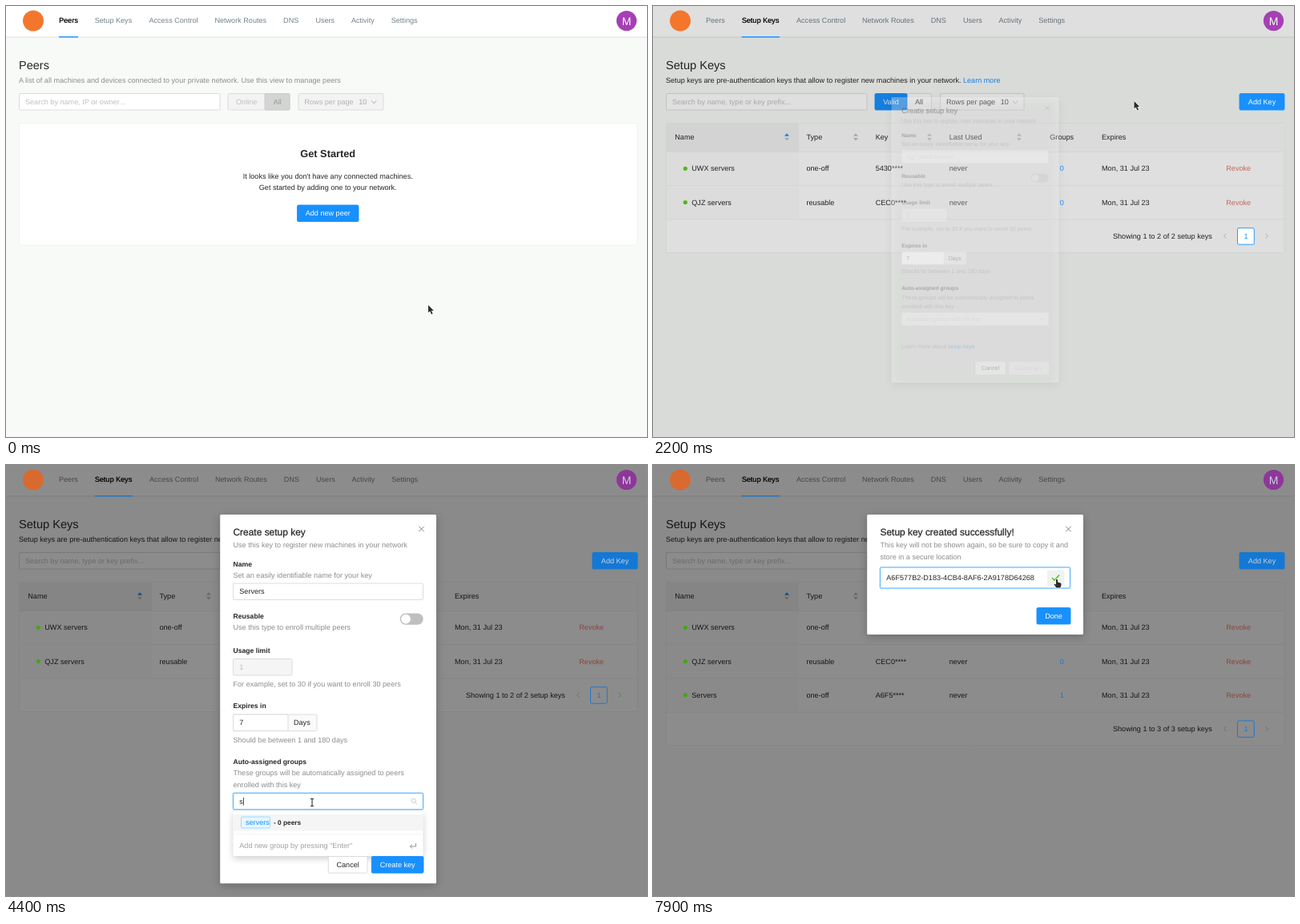
Write an HTML page with a canvas that moves like this. It is 800 by 539 pixels and loops after 8000 ms.

```html
<!DOCTYPE html>
<html lang="en">
<head>
<meta charset="utf-8">
<title>Setup keys</title>
<style>
  html, body { margin: 0; width: 100%; height: 100%; overflow: hidden; background: #f8faf8; }
  canvas { display: block; }
</style>
</head>
<body>
<canvas id="stage" width="800" height="539"></canvas>
<script>
const ctx = document.getElementById('stage').getContext('2d');
const LOOP = 8000, STEP = 100, BODY = 9.1;
const INK = '#262626', MUTED = '#8c8c8c', FAINT = '#bfbfbf', LINE = '#d9d9d9', BLUE = '#1890ff';

// Moments of the story, in ms
const AT = {
  keysPage: 1000, modal: 2150, focusName: 2700, typeName: 2950, focusGroups: 4200,
  typeGroup: 4400, addGroup: 5200, closeGroups: 5900, create: 6500, done: 6850, copied: 7600
};
const POINTER_PATH = [
  [0, 527, 374], [300, 527, 374], [900, 133, 18], [1200, 133, 18], [1900, 770, 118], [2100, 770, 118],
  [2300, 431, 120], [2600, 384, 157], [3700, 384, 157], [4100, 382, 422], [5400, 382, 422],
  [5800, 500, 350], [5900, 500, 350], [6400, 487, 498], [6900, 487, 498], [7500, 503, 143], [8000, 503, 143]
];

const clamp = v => Math.max(0, Math.min(1, v));
const smooth = v => v * v * (3 - 2 * v);

// y is the middle of the capital letters
function text(str, x, y, color = INK, { size = BODY, bold = false, align = 'left' } = {}) {
  ctx.font = `${bold ? 'bold ' : ''}${size}px "Liberation Sans", Arial, sans-serif`;
  ctx.textRendering = 'geometricPrecision';
  ctx.textAlign = align;
  ctx.fillStyle = color;
  ctx.fillText(str, x, y + size * 0.35);
  return ctx.measureText(str).width;
}
const label = (str, y) => text(str, 283.5, y, INK, { size: 8.65, bold: true });
const hint = (str, y) => text(str, 283.5, y, MUTED);

function heading(str, y) {
  text(str, 283.5, y, INK, { size: 11.95 });
  ctx.strokeStyle = INK;
  ctx.lineWidth = 0.25;
  ctx.strokeText(str, 283.5, y + 11.95 * 0.35);
}

function box(x1, y1, x2, y2, fill, stroke, radius = 1.5) {
  ctx.beginPath();
  ctx.roundRect(x1, y1, x2 - x1, y2 - y1, radius);
  if (fill) { ctx.fillStyle = fill; ctx.fill(); }
  if (stroke) { ctx.strokeStyle = stroke; ctx.lineWidth = 0.9; ctx.stroke(); }
}

function fill(x, y, w, h, color) {
  ctx.fillStyle = color;
  ctx.fillRect(x, y, w, h);
}

function disc(x, y, r, color) {
  ctx.beginPath();
  ctx.arc(x, y, r, 0, 7);
  ctx.fillStyle = color;
  ctx.fill();
}

function stroke(points, color, width = 0.9) {
  ctx.beginPath();
  points.forEach(([x, y]) => ctx.lineTo(x, y));
  ctx.strokeStyle = color;
  ctx.lineWidth = width;
  ctx.stroke();
}

function polygon(points, color) {
  ctx.beginPath();
  points.forEach(([x, y]) => ctx.lineTo(x, y));
  ctx.closePath();
  ctx.fillStyle = color;
  ctx.fill();
}

const chevron = (x, y, color = FAINT) => stroke([[x - 3, y - 1.7], [x, y + 1.9], [x + 3, y - 1.7]], color);
const check = (x, y, r, color, width) =>
  stroke([[x - r, y], [x - r * 0.3, y + r * 0.7], [x + r, y - r * 0.8]], color, width);
function cross(x, y, r, color) {
  stroke([[x - r, y - r], [x + r, y + r]], color);
  stroke([[x - r, y + r], [x + r, y - r]], color);
}

function button(str, x1, y1, x2, y2, color = BLUE, textColor = '#fff', border = color) {
  box(x1, y1, x2, y2, color, border);
  text(str, (x1 + x2) / 2, (y1 + y2) / 2, textColor, { align: 'center' });
}

function field(x1, y1, x2, y2, focused) {
  if (focused) box(x1 - 1, y1 - 1, x2 + 1, y2 + 1, '#d4ebff', null, 2.5);
  box(x1, y1, x2, y2, '#fff', focused ? '#40a9ff' : LINE);
}

function caret(x, y, t) {
  if (t % 1000 < 600) fill(x + 0.3, y - 5, 0.8, 10, INK);
}

const typed = (str, start, pace, t) => str.slice(0, Math.max(0, Math.floor((t - start) / pace) + 1));

// ---- Page ----

function navigation(onKeys) {
  fill(0, 0, 800, 38.5, '#fff');
  fill(0, 38.5, 800, 1, '#e2e4e2');
  const tabs = [['Peers', 66], ['Setup Keys', 110.7], ['Access Control', 179], ['Network Routes', 261],
    ['DNS', 346.7], ['Users', 387], ['Activity', 431.5], ['Settings', 481.3]];
  tabs.forEach(([name, x], i) => {
    const active = i === (onKeys ? 1 : 0);
    text(name, x - (onKeys || i < 2 ? 0 : 0.6), 18.3, active ? '#111' : '#72808a');
    if (active) text(name, x + 0.25, 18.3, '#111');
  });
}

function peersPage() {
  text('Peers', 16, 74, INK, { size: 14.5 });
  text('A list of all machines and devices connected to your private network. Use this view to manage peers', 16, 93, MUTED);
  box(16.5, 109.5, 267, 130, '#fff', LINE);
  text('Search by name, IP or owner...', 24, 120, FAINT);
  box(277, 109.5, 354, 130, '#f2f3f2', LINE);
  box(323, 109.5, 354, 130, '#d3d5d3', '#cacaca');
  text('Online', 287, 120, FAINT);
  text('All', 338.7, 120, '#999', { align: 'center' });
  box(365, 109.5, 471, 130, '#f2f3f2', LINE);
  text('Rows per page', 372.5, 120, '#b3b3b3');
  text('10', 440.3, 120, '#a6a6a6');
  chevron(459.3, 120, '#a6a6a6');
  box(16.5, 146.5, 788, 299, '#fff', '#f0f1f0');
  text('Get Started', 401.7, 185, INK, { size: 12.8, bold: true, align: 'center' });
  text("It looks like you don't have any connected machines.", 401.7, 213, INK, { align: 'center' });
  text('Get started by adding one to your network.', 401.7, 227.3, INK, { align: 'center' });
  button('Add new peer', 363.5, 249, 440, 269.5);
}

const ROWS = [
  ['UWX servers', 'one-off', '5430****', '0'],
  ['QJZ servers', 'reusable', 'CEC0****', '0'],
  ['Servers', 'one-off', 'A6F5****', '1']
];
const rowY = i => 203.3 + 42.2 * i;

function keysPage(count) {
  text('Setup Keys', 16, 74, INK, { size: 14.6 });
  const intro = 'Setup keys are pre-authentication keys that allow to register new machines in your network. ';
  const width = text(intro, 16, 93);
  text('Learn more', 16 + width, 93, BLUE);
  box(16.5, 109.5, 267, 130, '#fff', LINE);
  text('Search by name, type or key prefix...', 24, 120, FAINT);
  box(317, 109.5, 347.5, 130, '#fff', LINE);
  button('Valid', 277, 109.5, 317, 130);
  text('All', 332, 120, INK, { align: 'center' });
  box(358.5, 109.5, 463, 130, '#fff', LINE);
  text('Rows per page', 366, 120);
  text('10', 433.7, 120);
  chevron(452, 120);

  const bottom = rowY(count - 1) + 21;
  box(16.5, 146.5, 788, bottom + 42, '#fff', '#f0f1f0');
  fill(17, 147, 771, 35, '#f9faf9');
  fill(17, 147, 165, 35, '#f0f1f0');
  fill(17, 182, 165, bottom - 182, '#fafbfa');
  fill(17, 182, 771, 0.8, '#eeefee');
  const columns = [['Name', 27.3], ['Type', 191.5], ['Key', 277.7], ['Last Used', 369.7], ['Groups', 495.3], ['Expires', 560]];
  columns.forEach(([name, x]) => text(name, x, 164));
  [167, 253, 345, 457].forEach((x, i) => {
    polygon([[x - 3, 162.8], [x, 159.2], [x + 3, 162.8]], i ? FAINT : BLUE);
    polygon([[x - 3, 165], [x, 168.6], [x + 3, 165]], FAINT);
  });
  ROWS.slice(0, count).forEach(([name, type, key], i) => {
    const y = rowY(i);
    text(name, 48.3, y);
    text(type, 191.5, y);
    text(key, 277.7, y);
    text('never', 369.7, y);
    text('Mon, 31 Jul 23', 560, y);
    fill(17, y + 21, 771, 0.8, '#eeefee');
  });
  const y = rowY(count);
  text(`Showing 1 to ${count} of ${count} setup keys`, 574, y);
  stroke([[715.5, y - 3], [712.5, y], [715.5, y + 3]], FAINT);
  stroke([[764.5, y - 3], [767.5, y], [764.5, y + 3]], FAINT);
}

// Saturated parts keep most of their strength under the dialog mask
function accents(t, onKeys, count, dim) {
  const blue = dim ? '#1478d4' : BLUE, white = dim ? '#c9d2dc' : '#fff';
  disc(34, 18.5, 13, dim ? '#d86a30' : '#f4762d');
  disc(774.5, 18.5, 12.6, dim ? '#8d3799' : '#a540b4');
  text('M', 774.5, 18.7, white, { size: 14, align: 'center' });
  fill(onKeys ? 110.7 : 66, 38, onKeys ? 47.3 : 24, 1.4, blue);
  if (!onKeys) return;
  const hovered = t >= 1900 && t < 2200;
  button('Add Key', 732, 109.5, 788, 130, hovered ? '#379ffb' : blue, white);
  ROWS.slice(0, count).forEach((row, i) => {
    disc(40.3, rowY(i), 2.6, dim ? '#45a516' : '#52b61a');
    text(row[3], 510.3, rowY(i), blue, { align: 'center' });
    text('Revoke', 715.3, rowY(i), dim ? '#8f4339' : '#c4665c');
  });
  const y = rowY(count);
  box(729.5, y - 10, 750.3, y + 10.5, dim ? null : '#fff', blue);
  text('1', 740, y + 0.2, blue, { align: 'center' });
}

// ---- Dialogs ----

function dialog(bottom) {
  ctx.save();
  ctx.shadowColor = 'rgba(0,0,0,.22)';
  ctx.shadowBlur = 12;
  ctx.shadowOffsetY = 3;
  box(267.2, 62, 537, bottom, '#fff');
  ctx.restore();
  cross(518.5, 80, 3.3, '#777');
}

function groupTag(x, y, right, bold) {
  box(x, y - 7, right, y + 7, '#e6f7ff', '#91d5ff');
  text('servers', x + 5.5, y, BLUE, { bold, size: bold ? 8.3 : BODY });
}

function groupSelect(t) {
  const open = t >= AT.focusGroups && t < AT.closeGroups;
  const added = t >= AT.addGroup;
  const query = added ? '' : typed('servers', AT.typeGroup, 100, t);
  field(283.5, 410.3, 520.5, 430.8, open);
  if (added) {
    groupTag(286.8, 421, 332.5, true);
    cross(324.3, 421, 2.2, '#7793a8');
  } else if (query) {
    caret(291.3 + text(query, 291.3, 420.7), 420.7, t);
  } else {
    text('Associate groups with the key', 291.3, 420.7, FAINT);
  }
  if (!open) return chevron(509.5, 420.5);

  ctx.beginPath();
  ctx.arc(508.7, 419.8, 2.6, 0, 7);
  ctx.strokeStyle = FAINT;
  ctx.lineWidth = 0.8;
  ctx.stroke();
  stroke([[510.6, 421.8], [513, 424.2]], FAINT);

  const hasOption = added || query;
  ctx.save();
  ctx.shadowColor = 'rgba(0,0,0,.2)';
  ctx.shadowBlur = 9;
  ctx.shadowOffsetY = 3;
  box(283.5, 433.5, 520.5, hasOption ? 489 : 462, '#fff');
  ctx.restore();
  if (hasOption) {
    fill(284, 437, 236, 20.5, added ? '#e9f5fc' : '#f5f5f5');
    groupTag(293.5, 447, 329.5, false);
    text('- 0 peers', 334, 447, INK, { size: 8.3, bold: true });
    if (added) check(505.5, 447, 4, BLUE, 1.1);
    fill(284, 461.5, 236, 0.7, '#eeeeee');
  }
  const y = hasOption ? 476 : 448;
  text('Add new group by pressing "Enter"', 291.3, y, '#a0a0a0');
  stroke([[511.5, y - 3], [511.5, y + 1], [504.5, y + 1]], MUTED);
  stroke([[507, y - 1.5], [504.3, y + 1], [507, y + 3.5]], MUTED);
}

function createDialog(t) {
  dialog(523.3);
  heading('Create setup key', 84);
  hint('Use this key to register new machines in your network', 100.3);

  label('Name', 124);
  hint('Set an easily identifiable name for your key', 137.7);
  const name = typed('Servers', AT.typeName, 120, t);
  const focused = t >= AT.focusName && t < AT.focusGroups;
  field(283.5, 148, 520.5, 168.5, focused);
  const width = text(name || 'e.g. "UWX servers"', 291.3, 158.3, name ? INK : FAINT);
  if (focused) caret(291.3 + (name ? width : 0), 158.3, name ? 0 : t);

  label('Reusable', 189);
  hint('Use this type to enroll multiple peers', 203.2);
  box(491.7, 185.5, 520.7, 199.8, FAINT, null, 7.2);
  disc(499, 192.7, 5.9, '#fff');

  label('Usage limit', 231.7);
  box(283.5, 242.5, 357, 263, '#f5f5f5', LINE);
  text('1', 291.3, 253, FAINT);
  hint('For example, set to 30 if you want to enroll 30 peers', 274);

  label('Expires in', 301.3);
  box(283.5, 312, 388, 332.5, '#fafafa', LINE);
  box(283.5, 312, 352, 332.5, '#fff', LINE);
  text('7', 291.3, 322.3);
  text('Days', 359, 322.3);
  hint('Should be between 1 and 180 days', 343.7);

  label('Auto-assigned groups', 371);
  hint('These groups will be automatically assigned to peers', 385.3);
  hint('enrolled with this key', 399.7);
  const lead = hint('Learn more about ', 464);
  text('setup keys', 283.5 + lead, 464, BLUE);
  groupSelect(t);

  button('Cancel', 402.3, 489.5, 451, 510.2, '#fff', INK, LINE);
  if (!name) button('Create key', 456.5, 489.5, 521, 510.2, '#f5f5f5', FAINT, LINE);
  else button('Create key', 456.3, 489.5, 521, 510.2, t >= AT.create ? '#0d74df' : BLUE, t >= AT.create ? '#a9cdf2' : '#fff');
}

function successDialog(t) {
  dialog(212);
  heading('Setup key created successfully!', 84);
  hint('This key will not be shown again, so be sure to copy it and', 100.3);
  hint('store in a secure location', 114.6);
  const copied = t >= AT.copied;
  field(283.5, 128, 520.5, 154, copied);
  text('A6F577B2-D183-4CB4-8AF6-2A9178D64268', 291.3, 141);
  if (t >= 7400) box(492, 131.5, 513.5, 151, '#f0f1f0');
  if (copied) check(502.5, 141, 4.5, '#52c41a', 1.5);
  else {
    box(500, 136, 506, 143.5, null, MUTED, 0.5);
    box(498, 138, 504, 145.5, '#fff', MUTED, 0.5);
  }
  button('Done', 479, 178.5, 521, 199);
}

// ---- Pointer ----

function pointerAt(t) {
  const i = POINTER_PATH.findIndex(p => p[0] > t);
  const [t1, x1, y1] = POINTER_PATH[i - 1], [t2, x2, y2] = POINTER_PATH[i];
  const k = smooth((t - t1) / (t2 - t1));
  return [x1 + (x2 - x1) * k, y1 + (y2 - y1) * k];
}

function pointer(t) {
  const [x, y] = pointerAt(t);
  const inField = (t >= 2600 && t < 3800) || (t >= 4100 && t < 5500);
  const busy = t >= AT.create && t < AT.done;
  ctx.save();
  ctx.translate(x, y);
  if (inField) {
    fill(-0.5, -4.5, 1.1, 9, '#333');
    fill(-2, -5, 4, 1, '#333');
    fill(-2, 4, 4, 1, '#333');
  } else if (busy) {
    disc(0, 0, 6, '#e8e8e8');
    disc(0, 0, 5.3, '#222');
    disc(0, 0, 3.5, '#b8b8b8');
    stroke([[-3, 3], [3, -3]], '#222', 1.6);
  } else {
    const hand = t >= 7400;
    const shape = hand
      ? [[0, 0], [1.8, 0], [2.2, 3.6], [6.3, 4.8], [6.6, 7], [5.4, 10.5], [0.4, 10.5], [-2.6, 6.2], [-1.6, 5.4], [0, 6.8]]
      : [[0, 0], [0, 9.6], [2.2, 7.6], [3.9, 11.6], [5.6, 10.9], [3.9, 7], [6.8, 7]];
    stroke([...shape, shape[0]], '#fff', 1.4);
    polygon(shape, '#2b2b2b');
  }
  ctx.restore();
}

// ---- Scene ----

function draw(t) {
  const onKeys = t >= AT.keysPage, created = t >= AT.done;
  const count = created ? 3 : 2;
  const opening = clamp((t - AT.modal) / 180);
  fill(0, 0, 800, 539, '#f8faf8');
  navigation(onKeys);
  if (onKeys) keysPage(count); else peersPage();
  if (opening) fill(0, 0, 800, 539, `rgba(0,0,0,${0.45 * opening})`);
  accents(t, onKeys, count, opening > 0.5);
  if (opening) {
    const scale = 1 - 0.6 * (1 - opening) ** 3;
    ctx.save();
    ctx.globalAlpha = opening;
    ctx.translate(402, 292);
    ctx.scale(scale, scale);
    ctx.translate(-402, -292);
    if (created) successDialog(t); else createDialog(t);
    ctx.restore();
  }
  pointer(t);
}

function frame() {
  const t = performance.now() % LOOP;
  draw(Math.floor(t / STEP) * STEP);
  requestAnimationFrame(frame);
}
frame();
</script>
</body>
</html>
```
